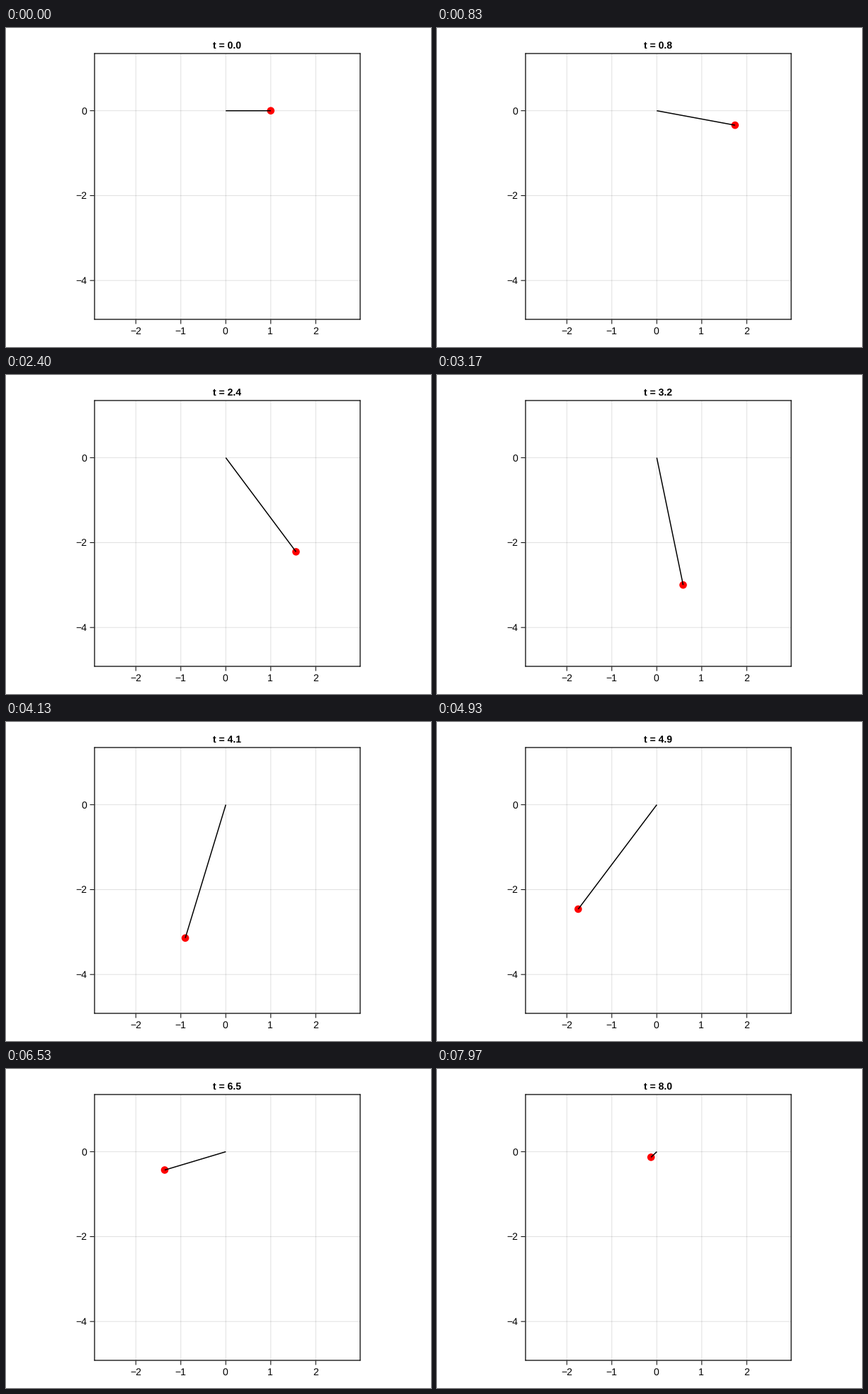
These frames come from a looping animation (600x450 px, 8 s). A matplotlib script:

```python
import numpy as np
import matplotlib.pyplot as plt
from matplotlib.animation import FuncAnimation
from matplotlib.patches import Circle

W, H, DPI = 600, 450, 100
FPS, POSES = 30, 240
TICK_MS, TICKS = 20, 400
LEFT, RIGHT, TOP, BOTTOM = 125, 500, 36, 411
PT = 72 / DPI  # points per pixel

plt.rcParams.update({
    "font.family": "Liberation Sans",
    "font.size": 14 * PT,
    "text.hinting": "none",
    "lines.solid_capstyle": "butt",
})


def px(x):
    return 310.3 + 63.5 * x


def py(y):
    return 116.7 - 59.87 * y


def deriv(s):
    """Mass on a spring with unit mass, stiffness, rest length and gravity."""
    pos, vel = s[:2], s[2:]
    r = np.hypot(*pos)
    acc = -(r - 1) * pos / r + np.array([0.0, -1.0])
    return np.concatenate([vel, acc])


def rk4(s, h):
    a = deriv(s)
    b = deriv(s + h / 2 * a)
    c = deriv(s + h / 2 * b)
    d = deriv(s + h * c)
    return s + h / 6 * (a + 2 * b + 2 * c + d)


def simulate(substeps=8):
    s = np.array([1.0, 0.0, 1.0, 0.0])
    path = [s[:2]]
    for _ in range(POSES - 1):
        for _ in range(substeps):
            s = rk4(s, 1 / FPS / substeps)
        path.append(s[:2])
    return np.array(path)


fig = plt.figure(figsize=(W / DPI, H / DPI), dpi=DPI, facecolor="white")
ax = fig.add_axes([0, 0, 1, 1])
ax.set_xlim(0, W)
ax.set_ylim(H, 0)
ax.axis("off")


def segment(xs, ys, width=1, **kw):
    kw.setdefault("color", "black")
    return ax.plot(xs, ys, lw=width * PT, snap=False, **kw)[0]


def label(v):
    return str(v).replace("-", "\u2212")


# Grid, ticks and tick labels
for v in (-2, -1, 0, 1, 2):
    x = px(v)
    segment([x, x], [TOP, BOTTOM], alpha=0.12, zorder=1)
    segment([x, x], [BOTTOM + 0.5, BOTTOM + 6.5])
    ax.text(x - 0.5, 432, label(v), ha="center", va="baseline")
for v in (-4, -2, 0):
    y = py(v)
    segment([LEFT, RIGHT], [y, y], alpha=0.12, zorder=1)
    segment([LEFT - 6.5, LEFT - 0.5], [y, y])
    ax.text(114, y + 5, label(v), ha="right", va="baseline")

# Frame centred on the edges of the plot area
for x in (LEFT, RIGHT):
    segment([x, x], [TOP - 0.5, BOTTOM + 0.5], 1.25)
for y in (TOP, BOTTOM):
    segment([LEFT - 0.5, RIGHT + 0.5], [y, y], 1.25)

title = ax.text((LEFT + RIGHT) / 2, 29, "", weight="bold",
                ha="center", va="baseline")
ball = ax.add_patch(Circle((0, 0), 5.3, fc="red", ec="none", zorder=3))
rod = segment([], [], 1.5, zorder=4)

path = simulate()


def update(tick):
    # Pose at the middle of the tick; poses start on whole hundredths of a second
    ms = (tick + 0.5) * TICK_MS
    n = int(ms * FPS / 1000 + 0.15)
    x, y = px(path[n, 0]), py(path[n, 1])
    ball.center = (x, y)
    rod.set_data([px(0), x], [py(0), y])
    title.set_text(f"t = {n / FPS:.1f}")
    return ball, rod, title


anim = FuncAnimation(fig, update, frames=TICKS, interval=TICK_MS,
                     repeat=True, repeat_delay=0, blit=False)
plt.show()
```
